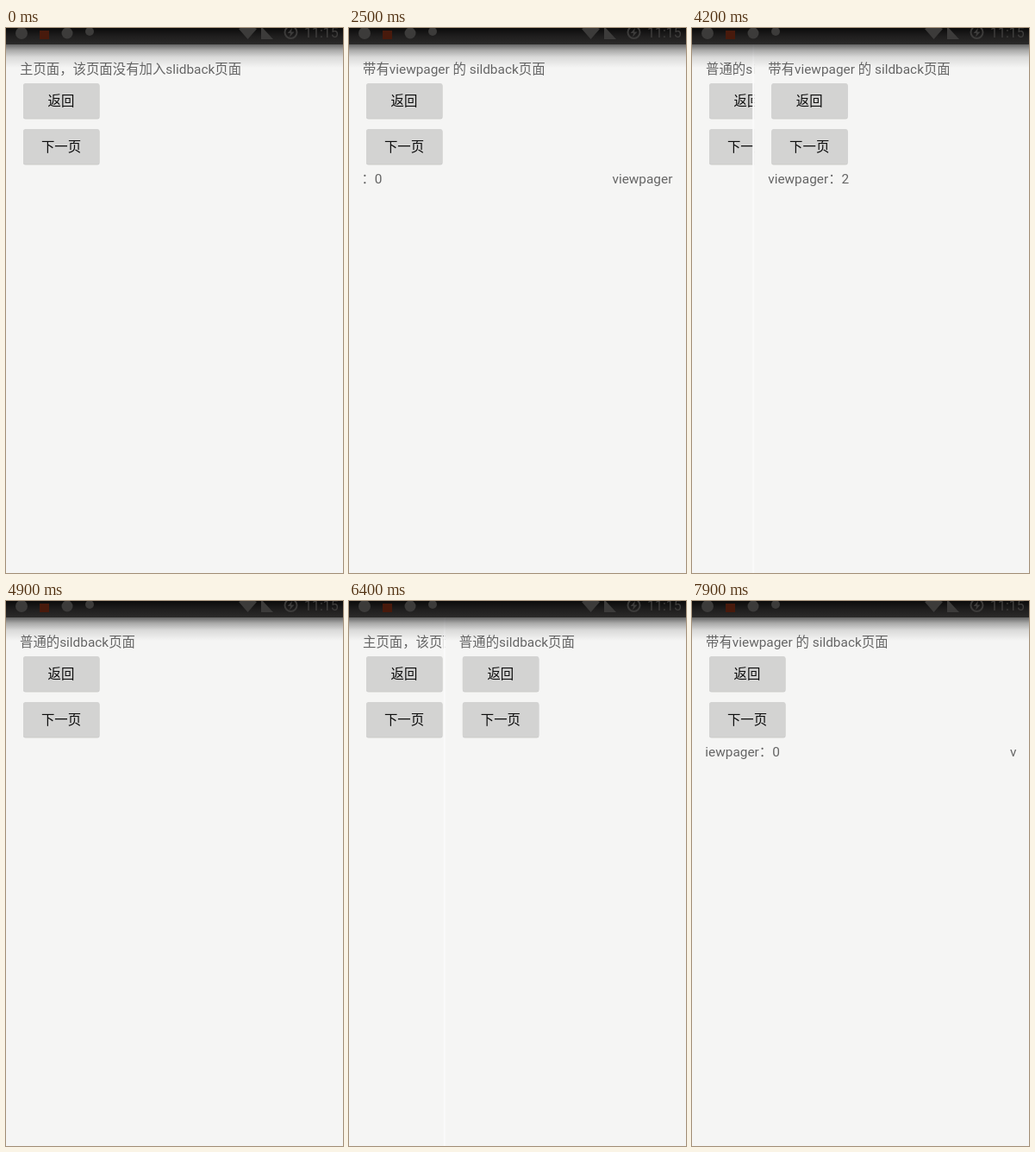
These frames come from a looping animation (391 px wide and 631 px high, 8000 ms). An HTML page:

```html
<!DOCTYPE html>
<html lang="zh-CN">
<head>
<meta charset="utf-8">
<style>
  html, body { margin: 0; width: 100%; height: 100%; overflow: hidden; background: #f5f5f4; }
  svg { display: block; width: 391px; height: 631px; }
  text { font: 15.4px Roboto, "Noto Sans CJK SC", "Noto Sans CJK", sans-serif; fill: #656565; white-space: pre; }
  .label { fill: #0c0c0c; text-anchor: middle; }
  .clock { font-size: 16px; fill: #3f3e3d; }
</style>
</head>
<body>
<svg viewBox="0 0 391 631">
  <defs>
    <linearGradient id="bar" x2="0" y2="1">
      <stop offset="0" stop-color="#0b0b0b"/>
      <stop offset=".5" stop-color="#1f1e1e"/>
      <stop offset="1" stop-color="#2b2a29"/>
    </linearGradient>
    <linearGradient id="shade" x2="0" y2="1">
      <stop offset="0" stop-color="#222" stop-opacity=".68"/>
      <stop offset=".25" stop-color="#222" stop-opacity=".36"/>
      <stop offset=".55" stop-color="#222" stop-opacity=".13"/>
      <stop offset="1" stop-color="#222" stop-opacity="0"/>
    </linearGradient>
    <clipPath id="strip"><rect x="16" y="160" width="361" height="30"/></clipPath>
  </defs>
  <g id="pages"></g>
  <rect y="19" width="391" height="27" fill="url(#shade)"/>
  <rect width="391" height="19" fill="url(#bar)"/>
  <g fill="#3c3b3a">
    <circle cx="18" cy="6" r="7"/>
    <rect x="39" y="3" width="11" height="10" fill="#481a0c"/>
    <circle cx="71" cy="6" r="6.5"/>
    <circle cx="97" cy="4" r="5"/>
    <path d="M270 1Q280.500 -5 291 1L280.500 13Z"/>
    <path d="M296 -2L310 13H296Z"/>
    <circle cx="330.500" cy="5" r="7" fill="none" stroke="#3c3b3a" stroke-width="2"/>
    <path d="M332 0L326.500 6H330L329 10.500L334.500 4.500H331Z"/>
    <text class="clock" x="346" y="11">11:15</text>
  </g>
</svg>
<script>
const LOOP = 8000, STEP = 100, STRIP = 361, AWAY = 393;

const part = (t, start, span) => Math.min(1, Math.max(0, (t - start) / span));
const smooth = p => p * p * (3 - 2 * p);
const easeOut = p => 1 - (1 - p) ** 3;

// a page flies in from the right, or is dragged off to the right
const enter = (t, start, span) => AWAY * (1 - part(t, start, span)) ** 3.07;
const leave = (t, start, span, power) => AWAY * part(t, start, span) ** power;

const plainX = t => t < 5700 ? enter(t, 0, 230) : t < 6600 ? leave(t, 5700, 900, 5) : enter(t, 6600, 300);
const pagerX = t => t < 3900 ? enter(t, 1000, 300) : t < 7000 ? leave(t, 3900, 950, 1.47) : enter(t, 7000, 300);
const swipe = t => STRIP * (t < 5000
  ? smooth(part(t, 2340, 560)) + easeOut(part(t, 3000, 400))
  : smooth(part(t, 7850, 560)));

const button = (y, label) => `
  <rect x="20" y="${y + 1}" width="88.500" height="40.500" rx="2.500" fill="#cbcbca"/>
  <rect x="20" y="${y}" width="88.500" height="40.500" rx="2.500" fill="#d3d3d2"/>
  <text class="label" x="64" y="${y + 25.8}">${label}</text>`;

const page = (id, title, extra = '') => `
  <g id="${id}">
    <rect width="400" height="631" fill="#f5f5f4"/>
    <rect x="-2" width="2" height="631" fill="#fafafa"/>
    <text x="16" y="53.300">${title}</text>
    ${button(64, '返回')}${button(117, '下一页')}${extra}
  </g>`;

const slots = [0, 1, 2].map(n => `<text x="${16 + STRIP * n}" y="180">viewpager：${n}</text>`).join('');
const el = id => document.getElementById(id);
el('pages').innerHTML =
  page('main', '主页面，该页面没有加入slidback页面') +
  page('plain', '普通的sildback页面') +
  page('pager', '带有viewpager 的 sildback页面', `<g clip-path="url(#strip)"><g id="slots">${slots}</g></g>`);

const shift = (id, x) => el(id).setAttribute('transform', `translate(${x} 0)`);

function draw(ms) {
  const t = Math.floor((ms % LOOP) / STEP) * STEP;
  shift('plain', plainX(t));
  shift('pager', pagerX(t));
  shift('slots', -swipe(t));
}

let start;
function tick(now) {
  start ??= now;
  draw(Math.max(0, now - start));
  requestAnimationFrame(tick);
}
draw(0);
requestAnimationFrame(tick);
</script>
</body>
</html>
```
